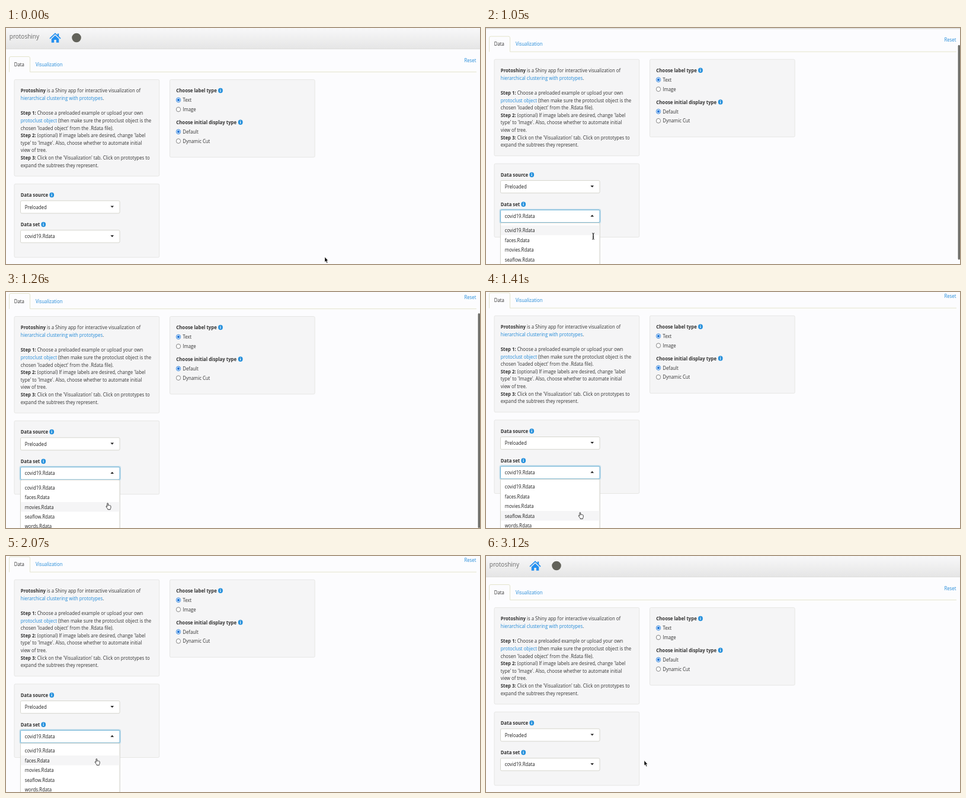
An HTML page for the animation above (3150 ms loop, 800 by 400 pixels).

```html
<!DOCTYPE html>
<html lang="en">
<head>
<meta charset="utf-8">
<title>protoshiny</title>
<style>
  html, body { margin: 0; width: 100%; height: 100%; overflow: hidden; background: #fcfcfe; }
  svg { display: block; width: 800px; height: 400px; }
  text { font: 14px "Open Sans", sans-serif; fill: #333; white-space: pre; }
  .b { font-weight: 700; }
  .link { fill: #2089d8; }
  .value { fill: #1e1e1e; }
  .brand { font-size: 18px; fill: #666; }
  .well { fill: #f5f5f6; stroke: #e6e6e4; }
  .field { fill: #fff; stroke: #d6d6ce; }
  .focus { stroke: #66afd4; }
  .glow { fill: none; stroke: #66afd4; stroke-width: 2.2; }
  .shadow { fill: #d4d4d0; opacity: .5; }
  .info { fill: #2590dc; }
</style>
</head>
<body>
<svg id="stage" viewBox="0 0 800 400"></svg>
<script>
const LOOP = 3150, STEP = 30, OPEN = 630, CLOSE = 2340;
const ROW_TOP = 369, ROW_H = 16.45;

// The page is shown slightly narrower than tall, so all type shares one scale.
const text = (x, y, s, cls = '') =>
  `<text class="${cls}" transform="translate(${x} ${y}) scale(.5556 .632)">${s}</text>`;
const span = (cls, s) => `<tspan class="${cls}">${s}</tspan>`;
const rect = (x, y, w, h, cls, id = '') =>
  `<rect id="${id}" x="${x}" y="${y}" width="${w}" height="${h}" rx="2" class="${cls}"/>`;
const info = (x, y) =>
  `<ellipse cx="${x}" cy="${y}" rx="3.9" ry="4.2" class="info"/>
   <path d="M${x - .1} ${y - 2.6}v1.2M${x - .1} ${y - .7}v3" stroke="#fff" stroke-width="1.2"/>`;
const radio = (y, label, on) =>
  `<ellipse cx="291" cy="${y}" rx="3.6" ry="3.9" fill="#fff" stroke="${on ? '#1673d8' : '#777'}" stroke-width=".9"/>` +
  (on ? `<ellipse cx="291" cy="${y}" rx="2.1" ry="2.3" fill="#1673d8"/>` : '') +
  text(298.3, y + 3.2, label);
const caret = (y, id) => `<path id="${id}" d="M176.4 ${y - 1.6}h5.6l-2.8 3.2z" fill="#222"/>`;

const intro = [
  span('b', 'Protoshiny') + ' is a Shiny app for interactive visualization of',
  span('link', 'hierarchical clustering with prototypes') + '.',
  '',
  span('b', 'Step 1:') + ' Choose a preloaded example or upload your own',
  span('link', 'protoclust object') + ' (then make sure the protoclust object is the',
  "chosen 'loaded object' from the .Rdata file).",
  span('b', 'Step 2:') + " (optional) If image labels are desired, change 'label",
  "type' to 'Image'. Also, choose whether to automate initial",
  'view of tree.',
  span('b', 'Step 3:') + " Click on the 'Visualization' tab. Click on prototypes to",
  'expand the subtrees they represent.'
];
const files = ['covid19', 'faces', 'movies', 'seaflow', 'words'];

const header = `
  <rect width="800" height="36" fill="url(#bar)"/>
  <path d="M0 35.5h800" stroke="#dededc"/>
  ${text(5.8, 17.7, 'protoshiny', 'brand')}
  <path d="M83 8.2l3.8 3.6v-2.3h2.4v4.5l3.4 3.2-1.2 1.3-8.4-7.9-8.4 7.9-1.2-1.3z
    M83 12.6l6.3 6v6.2h-4.5v-4.9h-3.6v4.9h-4.5v-6.2z" fill="#2490f0"/>
  <circle cx="119" cy="16.5" r="7.8" fill="#62625a"/>`;

const tabs = `
  <path d="M5 74.5h.5V51q0-2.5 2.5-2.5h30q2.5 0 2.5 2.5v23.5H794" fill="none" stroke="#e4e4cc"/>
  ${text(13.8, 64.5, 'Data')}
  ${text(50, 64.5, 'Visualization', 'link')}
  ${text(773.4, 57.6, 'Reset', 'link')}`;

const panels = `
  ${rect(14, 87.5, 244.7, 163.5, 'well')}
  ${intro.map((s, i) => text(24.8, 109.3 + 12.64 * i, s)).join('')}
  ${rect(276.5, 87.5, 244.7, 131.5, 'well')}
  ${text(287.3, 109.3, 'Choose label type', 'b')}${info(362, 106)}
  ${radio(122, 'Text', true)}${radio(138, 'Image')}
  ${text(287.3, 163, 'Choose initial display type', 'b')}${info(395.7, 159.7)}
  ${radio(175.8, 'Default', true)}${radio(191.6, 'Dynamic Cut')}
  ${rect(14, 264.3, 244.7, 124.5, 'well')}
  ${text(24.8, 286.2, 'Data source', 'b')}${info(77.2, 283)}
  ${rect(24.5, 292.8, 167.5, 21.2, 'field')}
  ${text(31.8, 306.6, 'Preloaded', 'value')}${caret(303, 'sourceCaret')}
  ${text(24.8, 336.2, 'Data set', 'b')}${info(63.2, 333)}
  ${rect(23.6, 341.8, 169.3, 23, 'glow', 'glow')}
  ${rect(24.5, 342.7, 167.5, 21.2, 'field', 'input')}
  ${text(31.8, 356.4, 'covid19.Rdata', 'value')}${caret(352.8, 'caret')}`;

const menu = `
  <g id="menu">
    ${rect(23.8, 365.4, 169.2, 87.2, 'shadow')}
    ${rect(24.5, 364.6, 167.5, 87, 'field')}
    <rect id="hover" x="25" width="166.5" height="${ROW_H}" fill="#f5f5f6"/>
    ${files.map((f, i) => text(31.8, 380.6 + ROW_H * i, f + '.Rdata', 'value')).join('')}
  </g>`;

const pointers = `
  <path id="arrow" d="M0 0v8.8l1.9-1.7 1.5 3.3 1.5-.7-1.5-3.2h2.4z" fill="#000" stroke="#fff" stroke-width=".6"/>
  <path id="beam" d="M-1.9-5.3q1.9 0 1.9 1.4v7.8q0 1.4-1.9 1.4M1.9-5.3q-1.9 0-1.9 1.4v7.8q0 1.4 1.9 1.4M-1 1.3h2"
    fill="none" stroke="#222" stroke-width="1"/>
  <path id="hand" d="M-2-4.4q0-1 .8-1t.9 1v3l1-.5 1 .3.9.1.9.4q.8.2.7 1.2v2q-.2 1.4-.9 2.4v1h-4.2v-1
    q-1.6-1.6-2.8-3.9-.3-.9.4-1.1.6-.1 1.3 1z" fill="#fff" stroke="#111" stroke-width=".8"/>`;

const $ = id => document.getElementById(id);
$('stage').innerHTML = `
  <defs><linearGradient id="bar" x2="0" y2="1">
    <stop stop-color="#f8f8f9"/><stop offset="1" stop-color="#e5e5e5"/>
  </linearGradient></defs>
  <rect width="800" height="400" fill="#fcfcfe"/>
  <g id="page">${header}${tabs}${panels}${menu}</g>
  <rect id="thumb" x="796.6" width="3.4" height="364" rx="1.7" fill="#6e6e6a"/>
  ${pointers}`;

const moveKeys = [[0, 538, 388], [450, 181, 353], [1170, 181, 353], [1380, 160, 379],
  [1740, 160, 379], [2070, 154, 349], [2220, 152, 331], [2430, 152, 331], [2820, 267, 346.5]];

const clamp = k => Math.max(0, Math.min(1, k));
const smooth = k => k * k * (3 - 2 * k);

function pointerAt(t) {
  const i = moveKeys.findIndex(k => k[0] > t);
  if (i < 0) return moveKeys[moveKeys.length - 1].slice(1);
  const [t0, x0, y0] = moveKeys[i - 1], [t1, x1, y1] = moveKeys[i];
  const k = smooth((t - t0) / (t1 - t0));
  return [x0 + (x1 - x0) * k, y0 + (y1 - y0) * k];
}

// A quick flick to the bottom, then a slow elastic overshoot that peaks at 1740 ms.
function scrollAt(t) {
  const flick = 1 - (1 - clamp((t - 870) / 330)) ** 2;
  return flick * (48.5 - 11e-6 * (t - 1740) ** 2);
}

const show = (id, on) => $(id).setAttribute('visibility', on ? 'visible' : 'hidden');

function draw(now) {
  const t = Math.floor(now % LOOP / STEP) * STEP;
  const open = t >= OPEN && t < CLOSE;
  const scroll = open ? scrollAt(t) : 0;
  const [x, y] = pointerAt(t);

  $('page').setAttribute('transform', `translate(0 ${-scroll})`);
  show('menu', open);
  // The focus ring fades in and out over 150 ms.
  const focus = clamp((t - OPEN) / 120) * clamp((CLOSE + 150 - t) / 150);
  $('glow').setAttribute('opacity', .35 * focus);
  $('input').setAttribute('class', focus > .5 ? 'field focus' : 'field');
  $('caret').setAttribute('transform', open ? 'rotate(180 179.2 352.6)' : '');

  const kind = t >= CLOSE ? 'arrow' : t > 1170 ? 'hand' : x < 192 ? 'beam' : 'arrow';
  const row = kind === 'hand' ? Math.floor((y + scroll - ROW_TOP) / ROW_H) : 0;
  $('hover').setAttribute('y', ROW_TOP + ROW_H * Math.max(0, Math.min(4, row)));

  show('thumb', t >= 900 && t < 1380);
  $('thumb').setAttribute('y', Math.min(36, scroll * 36 / 43));
  for (const id of ['arrow', 'beam', 'hand']) show(id, id === kind);
  $(kind).setAttribute('transform', `translate(${x} ${y})`);
}

const start = performance.now();
(function tick() {
  draw(performance.now() - start);
  requestAnimationFrame(tick);
})();
</script>
</body>
</html>
```
